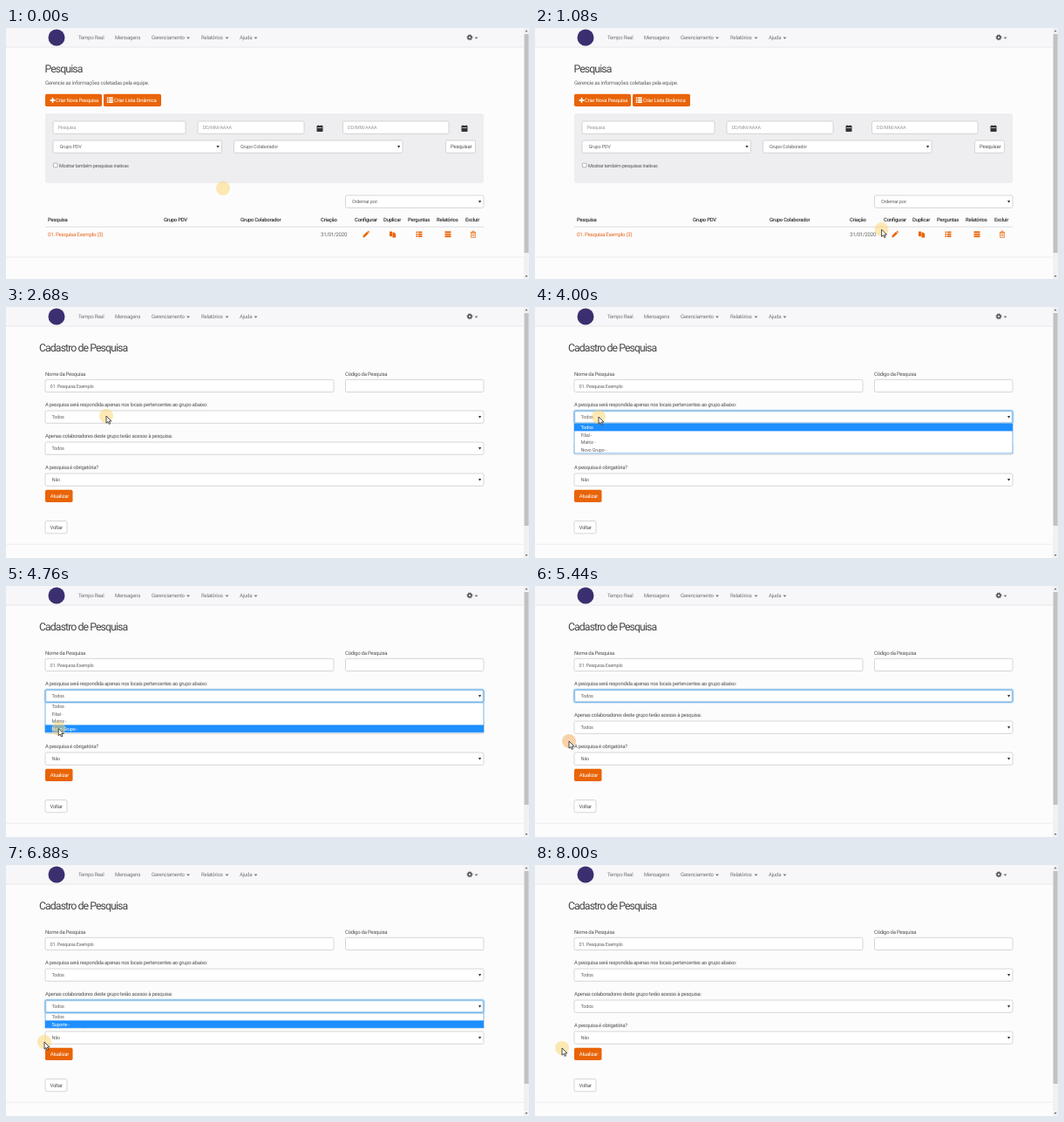
An HTML page that plays this animation: 600 by 288 pixels, repeating every 8400 ms.

```html
<!DOCTYPE html>
<html lang="pt-BR">
<head>
<meta charset="utf-8">
<title>Pesquisa</title>
<style>
html, body { margin: 0; width: 100%; height: 100%; overflow: hidden; background: #fdfcfd; }
svg { display: block; width: 600px; height: 288px; }
text { font: 6px Roboto, sans-serif; letter-spacing: -.045em; fill: #555; text-rendering: geometricPrecision; white-space: pre; }
.title { font-size: 12.3px; letter-spacing: -.075em; fill: #444; }
.nav { font-size: 6.1px; fill: #777; }
.sub { font-size: 6.2px; fill: #666; }
.hint { font-size: 5.5px; fill: #999; }
.field { font-size: 5.6px; fill: #666; }
.small { font-size: 5.5px; }
.head { font-weight: 500; fill: #333; }
.link { font-size: 6.2px; fill: #e2661c; }
.white { fill: #fff; }
.url { font-size: 5.2px; fill: #999; }
</style>
</head>
<body>
<svg viewBox="0 0 600 288">
  <g id="chrome"></g>
  <g id="list"></g>
  <g id="form"></g>
  <g id="overlay"></g>
  <g id="cursor">
    <circle id="halo" r="8"/>
    <path id="arrow" d="M0 0V8.2L1.9 6.5 3.2 9.4 4.6 8.8 3.3 6H5.9Z" fill="#fff" stroke="#222" stroke-width=".8"/>
    <path id="hand" d="M0 1.2Q.9 .2 1.8 1.2V4.4L5.6 5.2Q6.6 5.6 6.4 7L5.6 10.3H1L-1.8 6.6Q-1.6 5.3 0 6.2Z" fill="#fff" stroke="#222" stroke-width=".8"/>
  </g>
</svg>
<script>
const LOOP = 8400, STEP = 40, ORANGE = '#e96407', ROW = 8.5;
const $ = id => document.getElementById(id);

const text = (x, y, s, cls = '') => `<text x="${x}" y="${y}" class="${cls}">${s}</text>`;
const rect = (x, y, w, h, fill, extra = '') =>
  `<rect x="${x}" y="${y}" width="${w}" height="${h}" fill="${fill}" ${extra}/>`;
const path = (d, fill, extra = '') => `<path d="${d}" fill="${fill}" ${extra}/>`;
const caret = (x, y, fill = '#777') => path(`M${x} ${y}h4l-2 2.2z`, fill);
const box = (x, y, w, h = 14.3) => rect(x, y, w, h, '#fff', 'rx="1.8" stroke="#ccc" stroke-width=".8"');
const input = (x, y, w, s = '', cls = 'hint') => box(x, y, w) + text(x + 5.6, y + 9.3, s, cls);
const select = (x, y, w, s) =>
  box(x, y, w) + text(x + 7.5, y + 9.3, s, 'field') + path(`M${x + w - 6} ${y + 6}h3.2l-1.6 2.8z`, '#333');
const button = (x, y, w, s, dx = 5.8) =>
  rect(x, y, w, 14.4, ORANGE, 'rx="1.8"') + text(x + dx, y + 9.3, s, 'white');
const bars = (x, y, fill) => [0, 2.4, 4.8].map(d =>
  rect(x, y + d, 1.6, 1.7, fill) + rect(x + 2.3, y + d, 4.7, 1.7, fill)).join('');
const calendar = (x, y) =>
  rect(x, y + .6, 7, 6.8, '#333', 'rx=".6"') + rect(x + .8, y + 2.6, 5.4, .7, '#eeedef') +
  rect(x + 1.2, y, 1, 1.5, '#333') + rect(x + 4.8, y, 1, 1.5, '#333');

$('chrome').innerHTML =
  rect(0, 0, 600, 288, '#fdfcfd') + rect(0, 0, 594, 22, '#f7f6f8') + rect(0, 21.6, 594, .8, '#e2e1e3') +
  '<circle cx="58" cy="11" r="9.5" fill="#3b2f70"/>' +
  [[83, 'Tempo Real'], [125, 'Mensagens'], [167, 'Gerenciamento', 207], [224, 'Relatórios', 251.5], [268, 'Ajuda', 284.5]]
    .map(([x, s, c]) => text(x, 13.2, s, 'nav') + (c ? caret(c, 10.6) : '')).join('') +
  '<circle cx="532" cy="10.8" r="1.9" fill="none" stroke="#555" stroke-width="1.6"/>' +
  '<circle cx="532" cy="10.8" r="3" fill="none" stroke="#555" stroke-width="1" stroke-dasharray="1.18"/>' +
  caret(537.5, 10.6) +
  rect(594, 0, 6, 288, '#f1f1f1') +
  path('M595.5 4.2h3l-1.5-2z', '#666') + path('M595.5 284h3l-1.5 2z', '#666');

const columns = [[48, 'Pesquisa'], [181, 'Grupo PDV'], [269, 'Grupo Colaborador'], [361, 'Criação'], [400, 'Configurar'],
  [433, 'Duplicar'], [461, 'Perguntas'], [494, 'Relatórios'], [527, 'Excluir']];

$('list').innerHTML =
  rect(594.6, 7, 5, 251, '#c1c1c1') + rect(0, 262.6, 594, .8, '#eae9eb') +
  text(44.5, 51, 'Pesquisa', 'title') +
  text(45, 65, 'Gerencie as informações coletadas pela equipe.', 'sub') +
  button(45, 75.7, 65, 'Criar Nova Pesquisa', 12) + path('M52.7 80h1.6v2.1h2.1v1.6h-2.1v2.1h-1.6v-2.1h-2.1v-1.6h2.1z', '#fff') +
  button(112, 75.7, 66, 'Criar Lista Dinâmica', 12) + bars(115.8, 79.5, '#fff') +
  rect(45, 98, 503, 80, '#eeedef', 'rx="3"') +
  input(54, 107, 152, 'Pesquisa') + input(220, 107, 122, 'DD/MM/AAAA') + input(386.5, 107, 121.5, 'DD/MM/AAAA') +
  calendar(356.5, 111.5) + calendar(522.5, 111.5) +
  select(54, 129, 193.5, 'Grupo PDV') + select(261.5, 129, 193.5, 'Grupo Colaborador') +
  box(504.5, 129, 34) + text(510, 138.3, 'Pesquisar') +
  rect(54.4, 155.2, 4.6, 4.6, '#fff', 'rx=".6" stroke="#999" stroke-width=".7"') +
  text(61, 160, 'Mostrar também pesquisas inativas', 'small') +
  select(389.5, 192, 158.5, 'Ordernar por:') +
  columns.map(([x, s]) => text(x, 222.3, s, 'head')).join('') +
  rect(45, 227.7, 503, 1, '#dddcde') +
  text(48, 239.3, '01. Pesquisa Exemplo (3)', 'link') + text(361, 239.3, '31/01/2020', 'sub') +
  path('M409.3 240.4l.6-2.5 4.2-4.2 1.9 1.9-4.2 4.2zM414.6 233.2l.8-.7 1.8 1.8-.7.8z', ORANGE) +
  path('M440 233.5h3v5.5h-3zM443.4 234.6h2l1.7 1.7v4.2h-3.7z', ORANGE) +
  bars(470.5, 233.5, ORANGE) +
  [0, 2.5, 5].map(d => rect(503.5, 233.3 + d, 7, 1.8, ORANGE)).join('') +
  path('M533.6 235h4.8v5.4h-4.8zM532.8 234.4h6.4M535 234v-1h2v1M535.2 236.2v3M536.8 236.2v3', 'none', `stroke="${ORANGE}" stroke-width=".7"`);

$('form').innerHTML =
  rect(594.6, 7, 5, 244, '#c1c1c1') + rect(0, 271.8, 594, .8, '#eae9eb') +
  text(38, 51, 'Cadastro de Pesquisa', 'title') +
  text(45, 78.6, 'Nome da Pesquisa') + text(389, 78.6, 'Código da Pesquisa') +
  input(45, 83.3, 331, '01. Pesquisa Exemplo', 'field') + input(389.5, 83.3, 158.5) +
  text(45, 114.4, 'A pesquisa será respondida apenas nos locais pertencentes ao grupo abaixo:') +
  select(45, 119, 503, 'Todos') +
  text(45, 150.2, 'Apenas colaboradores deste grupo terão acesso à pesquisa:') +
  select(45, 155, 503, 'Todos') +
  text(45, 186, 'A pesquisa é obrigatória?') +
  select(45, 191, 503, 'Não') +
  button(45, 209.7, 31.5, 'Atualizar') +
  box(45, 245.5, 25) + text(50.5, 254.9, 'Voltar');

// Focus and popup times of the two group selects
const menus = [
  { y: 119, open: 3520, close: 5360, blur: 5600, items: ['Todos', 'Filial -', 'Matriz -', 'Novo Grupo -'] },
  { y: 155, open: 6120, close: 7100, blur: 7480, items: ['Todos', 'Suporte -'] },
];
const URL_FROM = 1880, PAGE_AT = 2320;
const clicks = [[1920, 2120], [3480, 3600], [5360, 5520], [6080, 6200], [7080, 7200], [7440, 7560]];

// Pointer stops: time, x, y
const stops = [[0, 249, 184], [840, 385, 226], [1400, 417, 239], [1800, 412, 233], [2160, 412, 233], [2680, 115, 125],
  [3240, 73, 126], [4080, 73, 126], [4400, 70, 147], [4800, 60, 164], [5160, 27, 176], [5320, 39, 178], [5480, 39, 178],
  [5800, 27, 170], [6080, 56, 162], [6240, 58, 164], [6560, 62, 182], [6880, 44, 203], [7080, 42, 206], [7440, 31, 210], [LOOP, 31, 210]];

function pointer(t) {
  const i = stops.findIndex(s => s[0] > t);
  const [t0, x0, y0] = stops[i - 1], [t1, x1, y1] = stops[i];
  const u = (t - t0) / (t1 - t0), k = u * u * (3 - 2 * u);
  return [x0 + (x1 - x0) * k, y0 + (y1 - y0) * k];
}

const within = (t, a, b) => t >= a && t < b;
const show = (id, on) => $(id).setAttribute('display', on ? 'inline' : 'none');

function menu({ y, open, close, blur, items }, t, py) {
  if (!within(t, open, blur)) return '';
  const top = y + 14.9;
  let out = rect(45, y, 503, 14.3, 'none', 'rx="1.8" stroke="#66afe9" stroke-opacity=".3" stroke-width="3"') +
    rect(45, y, 503, 14.3, 'none', 'rx="1.8" stroke="#66afe9" stroke-width=".9"');
  if (t >= close) return out;
  const hot = Math.max(0, Math.min(items.length - 1, Math.floor((py - top) / ROW)));
  out += rect(45, top, 503, items.length * ROW, '#fff', 'stroke="#5aa5e6" stroke-width=".8"');
  return out + rect(45, top + hot * ROW, 503, ROW, '#1e8fff') +
    items.map((s, i) => text(52.5, top + i * ROW + 6.3, s, i === hot ? 'field white' : 'field')).join('');
}

function draw(now) {
  const t = Math.floor(now % LOOP / STEP) * STEP;
  const [x, y] = pointer(t);
  const onLink = within(t, URL_FROM, PAGE_AT);
  const pressed = clicks.some(([a, b]) => within(t, a, b));
  show('list', t < PAGE_AT);
  show('form', t >= PAGE_AT);
  show('hand', onLink);
  show('arrow', t > 0 && !onLink);
  $('overlay').innerHTML = menus.map(m => menu(m, t, y)).join('') + (onLink
    ? rect(0, 281, 164, 7, '#f3f2f4') + text(1.5, 286.4, 'https://www.tmqdado.com.br/painel/cadastro-pesquisas.php?id=1198', 'url') : '');
  $('halo').setAttribute('fill', pressed ? 'rgba(244,165,85,.5)' : 'rgba(251,212,105,.5)');
  $('cursor').setAttribute('transform', `translate(${x.toFixed(2)} ${y.toFixed(2)})`);
  requestAnimationFrame(draw);
}
requestAnimationFrame(draw);
</script>
</body>
</html>
```
